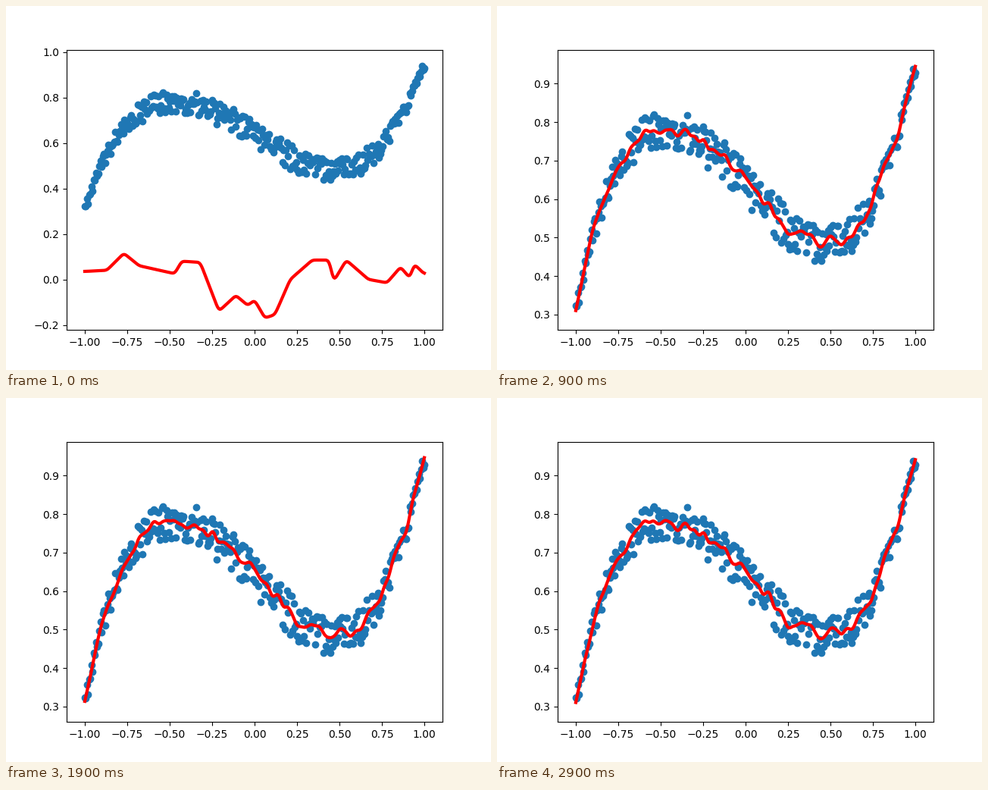
A matplotlib script for the animation above (3000 ms loop, 640 by 480 pixels).

```python
import numpy as np
import matplotlib.pyplot as plt
from matplotlib.animation import FuncAnimation

FRAMES, INTERVAL = 30, 100
N = 300
WIDE = (-0.2223, 1.0097)   # y range while the curve is still untrained
TIGHT = (0.2602, 0.9880)   # y range once it follows the data

x = np.linspace(-1, 1, N)


def smooth(values, width):
    """Gaussian average, width in samples, renormalised at both ends."""
    i = np.arange(N)
    weight = np.exp(-0.5 * ((i[:, None] - i) / width) ** 2)
    return weight @ values / weight.sum(axis=1)


# Data: a polynomial trend with noise that narrows towards the ends
key_y = [0.305, 0.635, 0.762, 0.772, 0.735, 0.64,
         0.535, 0.482, 0.51, 0.64, 0.945]
trend = np.polyval(np.polyfit(np.linspace(-1, 1, 11), key_y, 6), x)
rng = np.random.default_rng(4)
noise = 0.055 * (1 - 0.65 * x ** 4) * rng.uniform(-1, 1, N)
data = trend + noise
settled = trend + smooth(noise, 2.5)

# The untrained curve runs softly through a few turning points
turns = np.array([
    (-1, 0.035), (-0.87, 0.04), (-0.77, 0.115), (-0.68, 0.06),
    (-0.47, 0.025), (-0.43, 0.08), (-0.32, 0.075), (-0.21, -0.14),
    (-0.11, -0.07), (-0.04, -0.115), (0, -0.09), (0.06, -0.17),
    (0.12, -0.155), (0.21, 0), (0.34, 0.085), (0.44, 0.085),
    (0.465, -0.01), (0.54, 0.085), (0.67, 0), (0.78, -0.015),
    (0.86, 0.055), (0.915, 0.005), (0.94, 0.068), (1, 0.023)])
start = smooth(np.interp(x, *turns.T), 1.5)


def prediction(step):
    """Curve after the given step: a coarse fit that soon sharpens."""
    if step == 0:
        return start
    error = np.exp((3 - step) / 2)
    coarse = smooth(data, max(3 * error, 2.5))
    y = settled + min(error, 1) * (coarse - settled)
    wobble = np.random.default_rng(step).normal(0, 0.012, N)
    return y + smooth(wobble, 3)


fig, ax = plt.subplots(figsize=(6.4, 4.8), dpi=100)
ax.scatter(x, data)
line, = ax.plot(x, start, "r-", lw=3)
ax.set_xlim(-1.107, 1.107)


def update(step):
    line.set_ydata(prediction(step))
    ax.set_ylim(WIDE if step == 0 else TIGHT)
    return line,


anim = FuncAnimation(fig, update, frames=FRAMES, interval=INTERVAL,
                     repeat=True, repeat_delay=0)
plt.show()
```
